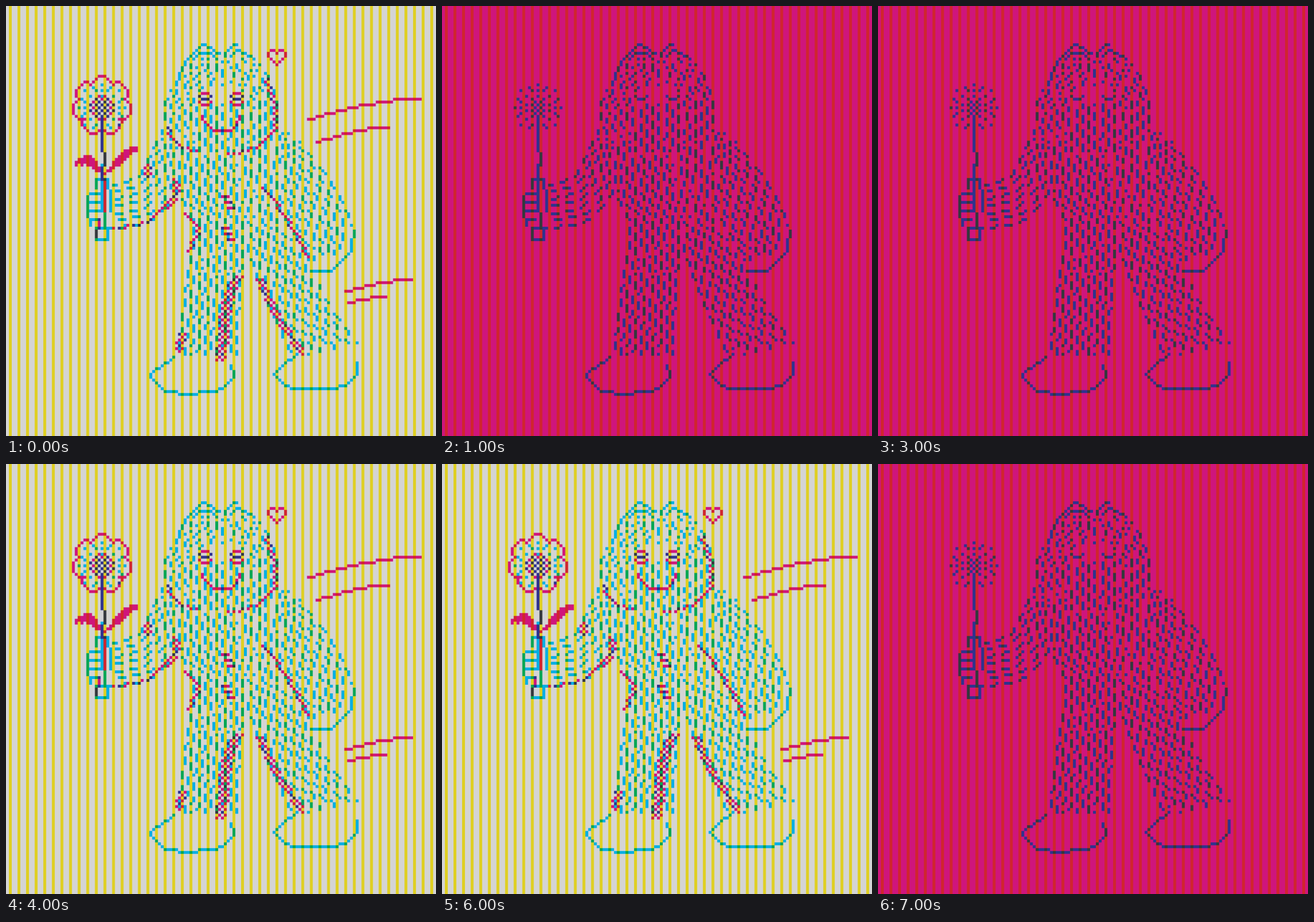
Recreate the animation shown at these times as an HTML page with a canvas. Size 748 by 748 pixels, loop 8 s.

```html
<!DOCTYPE html>
<html lang="en">
<head>
<meta charset="utf-8">
<title>Furry friend with a flower</title>
<style>
  html, body { margin: 0; width: 100%; height: 100%; overflow: hidden; background: #d4d4d4; }
  canvas { display: block; width: 748px; height: 748px; }
</style>
</head>
<body>
<canvas id="stage" width="748" height="748"></canvas>
<script>
const SIZE = 748, N = 150, CELL = SIZE / N;
const CYAN = 1, MAGENTA = 2, YELLOW = 4;
// Indexed by the inks that overlap in a cell.
const COLORS = ['#d4d4d4', '#00aee4', '#cf157c', '#2e328e', '#dfcf22', '#04a653', '#d0252e', '#34383c'];
const HOLD = 1000;
const TAU = Math.PI * 2;
const grid = new Uint8Array(N * N);

function put(x, y, ink) {
  if (x >= 0 && y >= 0 && x < N && y < N) grid[y * N + x] |= ink;
}

function rows(ink, x0, y0, x1, y1) {
  for (let y = y0; y <= y1; y++) for (let x = x0; x <= x1; x++) put(x, y, ink);
}

const sample = (fn, steps = 400) => Array.from({ length: steps + 1 }, (_, i) => fn(i / steps));

// Smooth path through key points.
function curve(...keys) {
  const last = keys.length - 1;
  const at = i => keys[Math.min(last, Math.max(0, i))];
  return sample(t => {
    const i = Math.min(last - 1, Math.floor(t * last)), u = t * last - i;
    return [0, 1].map(k => {
      const [a, b, c, d] = [at(i - 1)[k], at(i)[k], at(i + 1)[k], at(i + 2)[k]];
      return b + u / 2 * (c - a + u * (2 * a - 5 * b + 4 * c - d + u * (3 * (b - c) + d - a)));
    });
  });
}

function arc(cx, cy, rx, ry, from, to) {
  return sample(t => {
    const a = (from + (to - from) * t) * TAU;
    return [cx + rx * Math.cos(a), cy + ry * Math.sin(a)];
  });
}

// Distinct cells along a path, without stair corners.
function cellsOf(path) {
  const cells = [];
  for (const [px, py] of path) {
    const x = Math.floor(px / CELL), y = Math.floor(py / CELL);
    const n = cells.length, prev = cells[n - 1], older = cells[n - 2];
    if (prev && prev[0] === x && prev[1] === y) continue;
    if (older && Math.abs(older[0] - x) === 1 && Math.abs(older[1] - y) === 1) cells.pop();
    cells.push([x, y]);
  }
  return cells;
}

function line(ink, path) {
  for (const [x, y] of cellsOf(path)) put(x, y, ink);
}

// Dashed strands between two guides, kept clear of earlier ones.
function fur(count, left, right) {
  for (let i = 0; i < count; i++) {
    const k = i / (count - 1);
    const keys = left.map((p, j) => p.map((v, axis) => v + (right[j][axis] - v) * k));
    const before = grid.slice();
    const crowded = (x, y) => [-1, 0, 1].some(dx =>
      [-1, 0, 1].some(dy => before[(y + dy) * N + x + dx] & CYAN));
    cellsOf(curve(...keys)).forEach(([x, y], step) => {
      if ((step + i * 3) % 5 < 3 && !crowded(x, y)) put(x, y, CYAN);
    });
  }
}

// Checkered shadow along a path.
function shade(width, path) {
  for (const [x, y] of cellsOf(path)) {
    for (let d = 0; d < width; d++) {
      const sx = x + d - (width >> 1);
      if ((sx + y) % 2 === 0) put(sx, y, MAGENTA);
    }
  }
}

function drawFoot(x, y) {
  line(CYAN, curve([x + 42, y], [x + 2, y + 32], [x + 36, y + 60], [x + 108, y + 60],
    [x + 143, y + 42], [x + 143, y + 14]));
}

function drawOutlines() {
  line(CYAN, curve([297, 135], [312, 97], [334, 71], [352, 69], [372, 83]));
  line(CYAN, arc(396, 85, 15, 17, 0.5, 0.8));
  line(CYAN, arc(346, 93, 20, 11, 0.5, 1));
  line(CYAN, curve([393, 85], [408, 79], [433, 92]));
  line(CYAN, curve([605, 392], [598, 430], [570, 457], [533, 462]));
  drawFoot(250, 611);
  drawFoot(466, 605);
}

function drawHand() {
  rows(CYAN, 31, 60, 35, 60);
  rows(CYAN, 31, 77, 36, 77);
  rows(CYAN, 31, 81, 35, 81);
  for (const x of [31, 35]) {
    rows(CYAN, x, 60, x, 63);
    rows(CYAN, x, 77, x, 81);
  }
  for (let y = 65; y <= 74; y += 3) rows(CYAN, 29, y, 32, y);
  rows(CYAN, 28, 66, 28, 73);
  rows(CYAN, 29, 74, 29, 76);
  rows(CYAN, 36, 64, 36, 71);
  rows(MAGENTA, 31, 78, 31, 80);
}

function drawLeaf(...keys) {
  const cells = cellsOf(curve(...keys));
  cells.forEach(([x, y], i) => {
    const thick = Math.round(2.6 * Math.sin(Math.PI * i / cells.length));
    rows(MAGENTA, x, y, x, y + thick);
  });
}

function drawFlower() {
  const cx = 33, cy = 35;
  line(MAGENTA, sample(t => {
    const a = t * TAU, r = CELL * (8 + 2.3 * Math.sqrt(Math.abs(Math.cos(3.5 * a))));
    return [167 + r * Math.sin(a), 173 - r * Math.cos(a)];
  }));
  for (let y = -5; y <= 5; y++) for (let x = -5; x <= 5; x++) {
    if ((x + y) % 2 === 0 || Math.hypot(x, y) > 4.8) continue;
    put(cx + x, cy + y, Math.hypot(x, y) < 2.5 ? CYAN | MAGENTA : MAGENTA);
  }
  for (const [count, r] of [[10, 4], [16, 6], [16, 8]]) {
    for (let i = 0; i < count; i++) {
      const a = TAU * i / count;
      put(Math.round(cx + r * Math.sin(a)), Math.round(cy - r * Math.cos(a)), CYAN);
    }
  }
  rows(CYAN | MAGENTA, 33, 38, 33, 50);
  rows(CYAN | MAGENTA, 34, 51, 34, 55);
  rows(CYAN, 33, 55, 33, 71);
  rows(CYAN, 34, 72, 34, 76);
  rows(MAGENTA, 33, 56, 33, 60);
  rows(MAGENTA, 34, 60, 34, 71);
  rows(MAGENTA, 32, 74, 32, 77);
  drawLeaf([172, 294], [147, 262], [121, 271]);
  drawLeaf([175, 288], [201, 255], [228, 248]);
}

function drawEye(cx, cy) {
  for (let y = -2; y <= 2; y++) for (let x = -2; x <= 2; x++) {
    const ax = Math.abs(x), ay = Math.abs(y);
    if (Math.max(ax, ay) === 2 && ax + ay < 4 && y) put(cx + x, cy + y, MAGENTA);
    if (!y && ax < 2) put(cx + x, cy, CYAN | MAGENTA);
    if (ax === 2 && y === -1) put(cx + x, cy + y, CYAN);
  }
}

function drawFace() {
  drawEye(69, 32);
  drawEye(80, 32);
  line(MAGENTA, arc(375, 191, 33, 27, 0, 0.5));
}

function drawFur() {
  fur(6, [[327, 87], [298, 128], [275, 182], [285, 220]], [[372, 88], [352, 125], [322, 180], [326, 235]]);
  fur(6, [[433, 92], [457, 130], [471, 170], [469, 215]], [[383, 88], [399, 125], [424, 180], [422, 235]]);
  fur(5, [[362, 92], [340, 138]], [[395, 92], [412, 138]]);
  fur(8, [[333, 172], [335, 250]], [[413, 172], [410, 250]]);
  fur(7, [[277, 210], [248, 270], [232, 296], [187, 312]], [[295, 235], [299, 315], [262, 368], [187, 387]]);
  fur(10, [[480, 220], [460, 315], [485, 372], [528, 440]], [[490, 217], [548, 285], [596, 370], [594, 430]]);
  fur(10, [[295, 235], [306, 330], [329, 390], [314, 490], [300, 607]],
    [[385, 235], [402, 330], [412, 400], [405, 510], [400, 607]]);
  fur(10, [[393, 240], [410, 340], [424, 430], [455, 515], [500, 612]],
    [[478, 220], [474, 340], [520, 430], [557, 515], [609, 587]]);
}

function drawShadows() {
  shade(2, curve([456, 127], [469, 170], [470, 215]));
  shade(2, arc(377, 212, 92, 45, 0, 0.23));
  shade(2, arc(377, 212, 92, 45, 0.5, 0.33));
  shade(3, curve([248, 277], [247, 297]));
  shade(3, curve([292, 300], [296, 328], [278, 352]));
  shade(2, curve([268, 357], [240, 377], [187, 387]));
  shade(2, curve([316, 360], [337, 387], [321, 428]));
  shade(2, curve([451, 317], [492, 375], [526, 435]));
  shade(4, curve([410, 472], [388, 515], [377, 615]));
  shade(3, curve([441, 477], [474, 545], [516, 607]));
  shade(3, curve([306, 570], [302, 602]));
  for (const y of [66, 77]) {
    for (let i = 0; i < 3; i++) rows(MAGENTA, 75 + i, y + 2 * i, 77 + i, y + 2 * i);
  }
}

function drawSpeedLine(x0, y0, x1, y1) {
  line(MAGENTA, sample(t => [x0 + (x1 - x0) * t, y0 + (y1 - y0) * (1 - (1 - t) ** 1.6)]));
}

function drawHeart(x, y) {
  for (const side of [-1, 1]) {
    const at = (dx, dy) => [x + side * dx * CELL, y + dy * CELL];
    line(MAGENTA, curve(at(0, 1), at(1, 0), at(2, 0), at(3, 1), at(3, 2), at(0, 5)));
  }
}

function drawAccents() {
  drawSpeedLine(527, 198, 721, 161);
  drawSpeedLine(542, 238, 666, 211);
  drawSpeedLine(591, 498, 706, 476);
  drawSpeedLine(596, 517, 661, 506);
  drawHeart(471, 77.5);
}

function render(extraInk) {
  const unit = 5;
  const canvas = document.createElement('canvas');
  canvas.width = canvas.height = N * unit;
  const pen = canvas.getContext('2d');
  grid.forEach((ink, i) => {
    const x = i % N, y = Math.floor(i / N);
    const stripe = x % 3 === 1 ? YELLOW : 0;
    pen.fillStyle = COLORS[ink | stripe | extraInk];
    pen.fillRect(x * unit, y * unit, unit, unit);
  });
  return canvas;
}

drawOutlines();
drawHand();
drawFlower();
drawFace();
drawFur();
drawShadows();
drawAccents();

const scenes = [render(0), render(MAGENTA)];
const stage = document.getElementById('stage').getContext('2d');
const start = performance.now();

function frame() {
  const beat = Math.floor((performance.now() - start) / HOLD);
  stage.drawImage(scenes[beat % scenes.length], 0, 0, SIZE, SIZE);
  requestAnimationFrame(frame);
}
frame();
</script>
</body>
</html>
```
